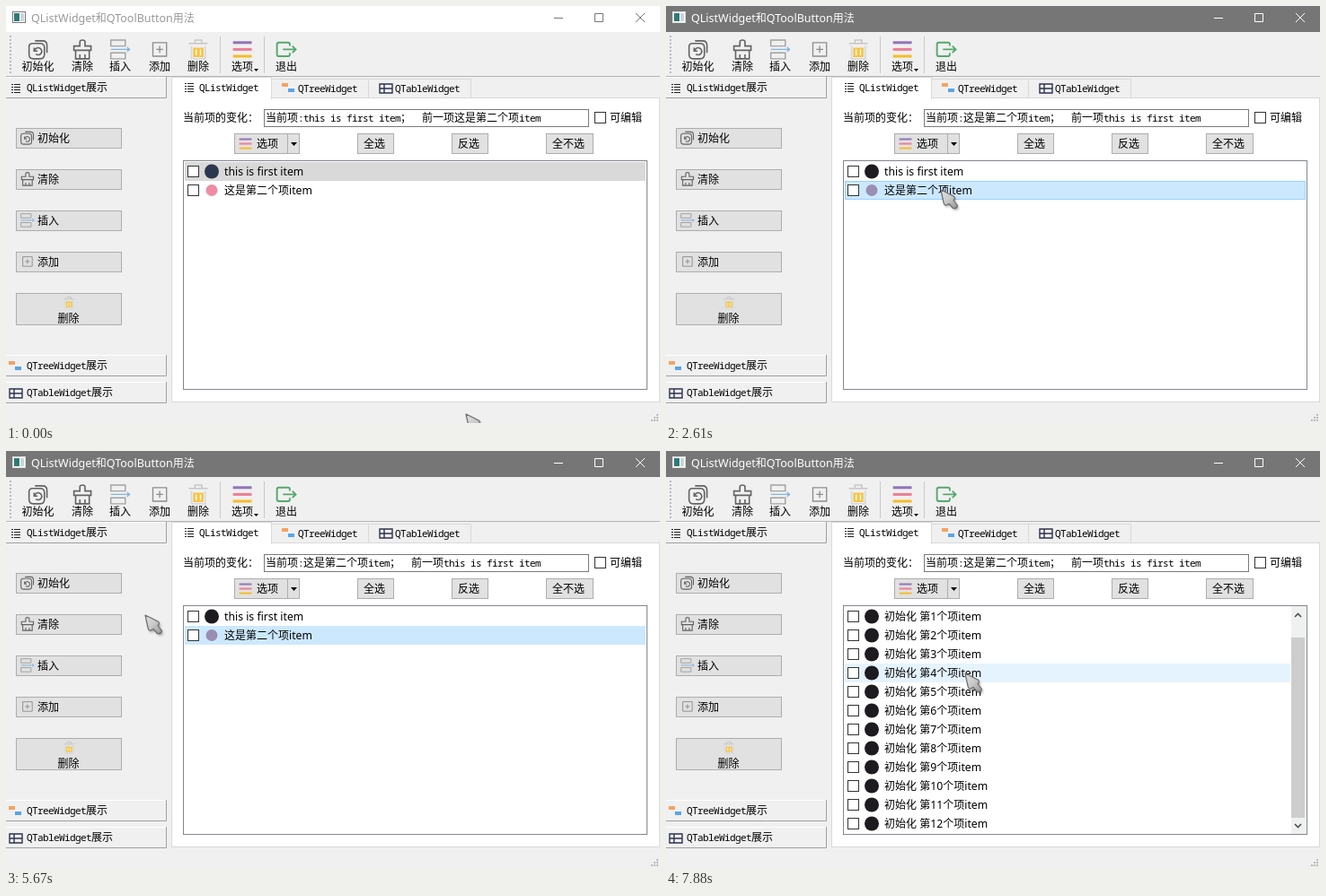
Animation of 728x465 px, one loop 8 s. Source, as an HTML page:

```html
<!DOCTYPE html>
<html lang="zh-CN">
<head>
<meta charset="utf-8">
<title>QListWidget</title>
<style>
html, body { margin: 0; width: 100%; height: 100%; overflow: hidden; background: #f0f0f0; }
svg { display: block; width: 728px; height: 465px; }
text { white-space: pre; font: 12px "Noto Sans CJK SC", "Noto Sans CJK", sans-serif; }
.ui { font: 12.25px "Noto Sans", "Open Sans", sans-serif; }
.title { font: 12.5px "Noto Sans", "Open Sans", sans-serif; }
.mono { font: 11px "Noto Sans Mono", "Liberation Mono", monospace; letter-spacing: -.6px; }
</style>
</head>
<body>
<svg viewBox="0 0 728 465">
  <defs>
    <linearGradient id="steel" x1="0" y1="0" x2="1" y2="1">
      <stop offset="0" stop-color="#e4e4e4"/><stop offset=".5" stop-color="#c8c8c8"/><stop offset="1" stop-color="#969696"/>
    </linearGradient>
    <filter id="soft" x="-30%" y="-30%" width="160%" height="160%"><feGaussianBlur stdDeviation="1.4"/></filter>
  </defs>
  <g id="base"></g>
  <g id="live"></g>
</svg>
<script>
const LOOP = 8000, ROW = 21, TOP = 174;

// drawing helpers, all returning SVG markup
const rect = (x, y, w, h, fill, line) => line
  ? `<rect x="${x + .5}" y="${y + .5}" width="${w - 1}" height="${h - 1}" fill="${fill}" stroke="${line}"/>`
  : `<rect x="${x}" y="${y}" width="${w}" height="${h}" fill="${fill}"/>`;
const path = (d, line, w = 1, fill = 'none') =>
  `<path d="${d}" stroke="${line}" stroke-width="${w}" fill="${fill}"/>`;
const dot = (x, y, r, fill) => `<circle cx="${x}" cy="${y}" r="${r}" fill="${fill}"/>`;
const place = (x, y, art, k = 1) => `<g transform="translate(${x} ${y}) scale(${k})">${art}</g>`;
const text = (x, y, s, cls = 'ui', fill = '#000') => {
  const runs = s.replace(/[\x20-\x7e]+/g, m => `<tspan class="${cls}">${m}</tspan>`);
  return `<text x="${x}" y="${y}" fill="${fill}">${runs}</text>`;
};
const check = (x, y) => rect(x, y, 13, 13, '#fff', '#333');
const down = (x, y) => path(`M${x - 3.5} ${y - 2}h7l-3.5 4z`, 'none', 0, '#000');

const G = '#636363', S = '#a2a2a2';
// icons on a 24 px square
const icon = {
  init: path('M8 2H17Q22 2 22 7V16M5 5H14Q19 5 19 10V18Q19 23 14 23H6Q1 23 1 18V9Q1 5 5 5', G, 1.7) +
        path('M7 10V14H11M7.5 14A4.2 4.2 0 1 1 9 17.5', G, 1.7),
  clear: path('M9 8V3Q9 1 12 1T15 3V8H22V13H2V8ZM4 13V23H20V13M9 18V23M15 18V23', G, 1.7),
  insert: path('M1 1H18V8H1ZM1 16H18V23H1Z', S, 1.5) + path('M1 12H23M20 9.5L23 12L20 14.5', '#86b4dc', 1.5),
  add: path('M4 4H20V20H4ZM12 8V16M8 12H16', '#8c8c8c', 1.4),
  del: path('M1 5H23M8 5V1H16V5', '#c6c6c6', 1.6) + path('M4 8V23H20V8', '#d8d8d8', 1.8) +
       rect(6, 10, 12, 11, '#f6c445') + path('M9.5 12V19M14.5 12V19', '#fff', 1.4),
  opts: path('M1 4H23', '#9274b8', 3.2) + path('M1 12H23', '#eb7f96', 3.2) + path('M1 20H23', '#f5bd2c', 3.2),
  exit: path('M16 8V6Q16 4 14 4H3Q1 4 1 6V18Q1 20 3 20H14Q16 20 16 18V16', '#55a86c', 2) +
        path('M8 12H23M19 8L23 12L19 16', '#55a86c', 2),
};
// small icons on a 14 px square
const mini = {
  list: [2, 5, 8, 11].map(y => rect(0, y, 2, 1, '#222') + rect(3, y, 7, 1, '#222')).join(''),
  tree: rect(0, 1, 7, 4, '#f3a45f') + rect(7, 7, 7, 4, '#5aa5e8'),
  table: path('M1 2H15V12H1ZM1 7H15M6 2V12', '#2b3252', 1.4),
};

const tools = [['init', '初始化', 36], ['clear', '清除', 85], ['insert', '插入', 127], ['add', '添加', 171],
  ['del', '删除', 214], ['opts', '选项', 263], ['exit', '退出', 312]];
const side = tools.slice(0, 5).map(([k, label], i) => ({ k, label, x: 11, y: 136 + 46 * i, w: 118, h: i == 4 ? 36 : 23 }));
const middle = [['全选', 391, 41], ['反选', 496, 41], ['全不选', 601, 53]].map(([label, x, w]) => ({ label, x, y: 142, w, h: 23 }));
const menuButton = { x: 254, y: 142, w: 73, h: 23 };

function header(y, art, label) {
  return rect(0, y, 179, 24, '#f0f0f0') + path(`M0 ${y + .5}H178`, '#fff') +
    path(`M0 ${y + 23.5}H178.5V${y}`, '#a0a0a0') + place(art == 'list' ? 6 : 3, y + 6, mini[art]) +
    text(23, y + 16, label, 'mono');
}
function tab(x, w, art, label, on) {
  return rect(x, on ? 79 : 81, w + 1, on ? 25 : 22, on ? '#fff' : '#f0f0f0', '#d9d9d9') +
    (on ? rect(x + 1, 102, w - 1, 3, '#fff') : '') + place(x + (on ? 15 : 12), on ? 84 : 85, mini[art]) +
    text(x + (on ? 31 : 30), on ? 95 : 96, label, 'mono');
}

function base() {
  let s = rect(0, 0, 728, 465, '#f0f0f0');
  for (let y = 33; y < 76; y += 4) s += rect(4, y, 2, 2, '#bbb');
  for (const [k, label, x] of tools) {
    s += place(x - 11.3, 37, icon[k], .95) + text(x - label.length * 6 - (k == 'init' ? .5 : 0), 72, label);
  }
  s += path('M238.5 34V75M287.5 34V75', '#c8c8c8') + path('M276 70H281L278.5 73Z', 'none', 0, '#000');
  s += path('M0 78.5H728', '#b4b4b4');
  s += header(79, 'list', 'QListWidget展示') + header(389, 'tree', 'QTreeWidget展示') + header(419, 'table', 'QTableWidget展示');
  s += rect(184, 102, 544, 340, '#fff', '#d9d9d9');
  s += tab(295, 108, 'tree', 'QTreeWidget') + tab(403, 114, 'table', 'QTableWidget') + tab(184, 111, 'list', 'QListWidget', true);
  s += text(197, 129, '当前项的变化：') + rect(287, 115, 362, 20, '#fff', '#7a7a7a');
  s += check(655, 118) + text(672, 129, '可编辑') + rect(197, 172, 517, 256, '#fff', '#828790');
  for (let i = 0; i < 3; i++) for (let j = 0; j <= i; j++) s += rect(724 - 3 * j, 455 + 3 * i, 2, 2, '#b9b9b9');
  return s;
}

// cursor tip: time, x, y
const track = [[0, 512, 455], [100, 478, 424], [430, 210, 245], [640, 112, 150], [860, 83, 97], [960, 84, 91],
  [1190, 150, 122], [1520, 286, 199], [1730, 300, 201], [2060, 305, 204], [2160, 306, 205], [2820, 306, 205],
  [2930, 278, 196], [3260, 118, 151], [3480, 108, 149], [3700, 198, 152], [3810, 232, 155], [4200, 313, 156],
  [4470, 321, 158], [5340, 321, 158], [5450, 268, 181], [5670, 155, 183], [5890, 82, 160], [6110, 42, 146],
  [6550, 42, 146], [6660, 68, 149], [7000, 235, 190], [7329, 332, 232], [7440, 335, 238], [7880, 333, 248]];
// movement bursts: first step, last step, number of steps
const bursts = [[100, 860, 8], [960, 1730, 8], [2060, 2160, 2], [2930, 3700, 8], [3810, 4470, 7],
  [5450, 6110, 7], [6660, 7440, 8], [7560, 7880, 4]];

function stepTime(t) {
  let q = 0;
  for (const [a, b, n] of bursts) {
    if (t < a) break;
    const d = (b - a) / (n - 1);
    q = a + d * Math.min(n - 1, Math.floor((t - a) / d + .02));
  }
  return q;
}
function cursorAt(t) {
  const q = stepTime(t), i = track.findIndex(p => p[0] >= q);
  if (i < 1) return [track[0][1], track[0][2]];
  const [a, x, y] = track[i - 1], [b, u, v] = track[i], k = (q - a) / (b - a);
  return [Math.round(x + (u - x) * k), Math.round(y + (v - y) * k)];
}

const inside = (b, [x, y]) => x >= b.x && x < b.x + b.w && y >= b.y && y < b.y + b.h;
const face = (b, hot, pressed) => pressed ? rect(b.x, b.y, b.w, b.h, '#cce4f7', '#005499')
  : rect(b.x, b.y, b.w, b.h, hot ? '#e5f1fb' : '#e1e1e1', hot ? '#0078d7' : '#adadad');

function titleBar(active) {
  const ink = active ? '#fff' : '#999';
  return rect(0, 0, 728, 29, active ? '#767676' : '#fff') + rect(7, 6, 15, 13, '#fff', active ? '#ddd' : '#777') +
    rect(9, 8, 6, 9, '#2f7a78') + rect(16, 8, 4, 9, '#c9d3d8') +
    text(28, 18, 'QListWidget和QToolButton用法', 'title', ink) +
    path('M610 13.5H620M655.5 8.5H664.5V17.5H655.5ZM701 8L711 18M711 8L701 18', active ? '#fff' : '#777');
}

function listRows(t, pos) {
  const filled = t >= 6450, first = t >= 7217 ? 1 : 0, right = filled ? 695 : 712;
  const labels = filled ? Array.from({ length: 12 }, (_, i) => `初始化 第${i + first}个项item`)
    : ['this is first item', '这是第二个项item'];
  const chosen = filled ? -1 : t < 2610 ? 0 : 1;
  let s = '';
  labels.forEach((label, i) => {
    const y = TOP + ROW * i, on = i == chosen;
    const hot = inside({ x: 199, y, w: right - 199, h: ROW }, pos);
    if (on) s += rect(199, y, right - 199, ROW, t < 2060 ? '#d9d9d9' : '#cce8ff', hot && t >= 2060 ? '#99d1ff' : '');
    else if (hot) s += rect(199, y, right - 199, ROW, '#e5f3ff');
    s += check(202, y + 4);
    s += !filled && i == 1 ? dot(229, y + 10.5, 6.5, on ? '#9b8db3' : '#f08ba3') : dot(229, y + 10.5, 8, on ? '#2a374d' : '#1d1a20');
    s += text(243, y + 15, label);
  });
  if (filled) {
    s += rect(696, 173, 17, 254, '#f0f0f0') + rect(696, first ? 208 : 191, 15, 201, '#cdcdcd') +
      path('M700 185L703.5 181.5L707 185M700 416L703.5 419.5L707 416', '#505050', 1.6);
  }
  return s;
}

function menu() {
  return `<rect x="257" y="170" width="140" height="71" fill="#000" opacity=".5" filter="url(#soft)"/>` +
    rect(253, 166, 142, 73, '#f0f0f0', '#c4c4c4') +
    ['全选', '反选', '全不选'].map((m, i) => text(288, 185 + 22 * i, m)).join('') + text(338, 185, 'Ctrl+A');
}

const arrow = 'M0 0L14 7Q17 9 14 11.5L18.5 17.5Q17.5 21.5 13.5 20.5L9 15.5L5.5 17.3Q3.5 17.2 3 14Z';
const cursor = ([x, y]) => place(x, y,
  `<path d="${arrow}" transform="translate(1.5 2)" opacity=".35" filter="url(#soft)"/>` +
  `<path d="${arrow}" fill="url(#steel)" stroke="#6e6e6e" stroke-width="1.2" stroke-linejoin="round"/>`);

function live(t) {
  const pos = cursorAt(t), open = t >= 4470 && t < 5120;
  let s = titleBar(t >= 1850);
  for (const b of side) {
    const tall = b.h > 30;
    s += face(b, inside(b, pos), b.k == 'init' && t >= 6340 && t < 6450);
    s += tall ? place(63.5, 324, icon.del, .56) + text(57.5, 353, b.label)
      : place(16, b.y + 3, icon[b.k], .66) + text(35, b.y + 16, b.label);
  }
  const hot = open || inside(menuButton, pos), edge = hot ? '#0078d7' : '#adadad';
  s += face(menuButton, hot) + (open ? rect(313, 142, 14, 23, '#cce4f7', edge) : path('M313.5 143V164', edge));
  s += place(259, 146, icon.opts, .63) + text(279, 158, '选项') + down(320.5, 154);
  for (const b of middle) s += face(b, inside(b, pos)) + text(b.x + 7, 158, b.label);
  s += text(289, 129, t < 2610 ? '当前项:this is first item；  前一项这是第二个项item'
    : '当前项:这是第二个项item；  前一项this is first item', 'mono');
  return s + listRows(t, pos) + (open ? menu() : '') + cursor(pos);
}

const stage = document.getElementById('live');
let shown = '';
document.getElementById('base').innerHTML = base();
const start = performance.now();
function draw(now) {
  const s = live(Math.max(0, now - start) % LOOP);
  if (s !== shown) stage.innerHTML = shown = s;
  requestAnimationFrame(draw);
}
draw(start);
</script>
</body>
</html>
```
